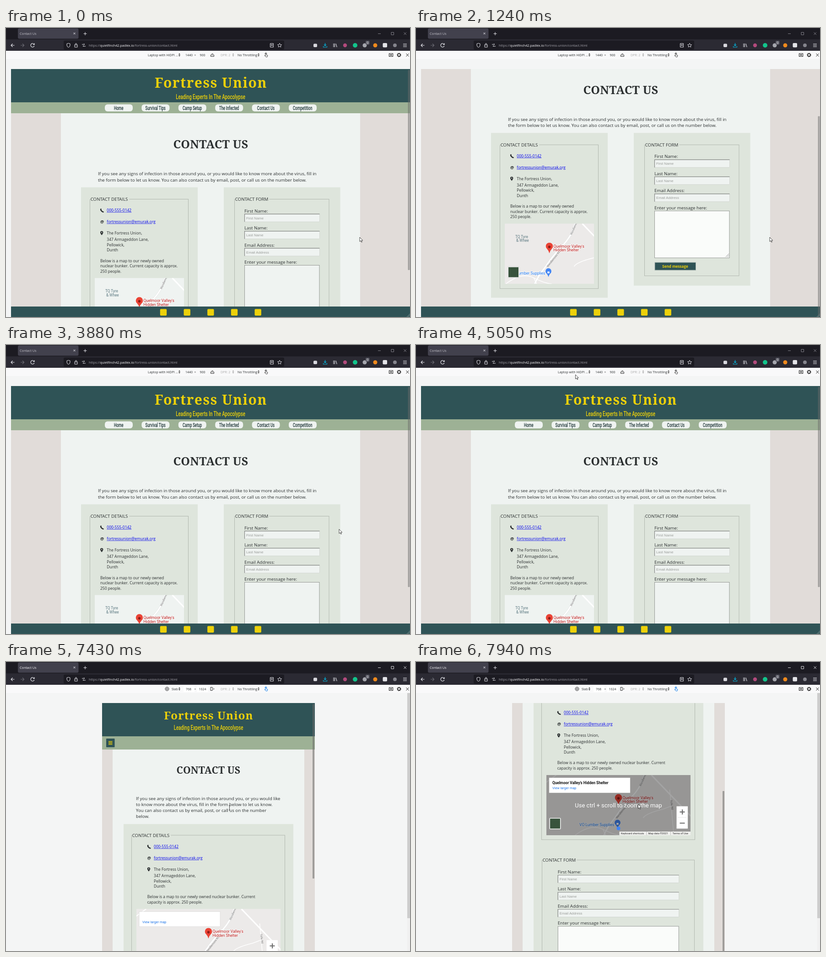
Animation of 883 by 634 pixels, one loop 8 s. Source, as an HTML page:

```html
<!DOCTYPE html>
<html lang="en">
<head>
<meta charset="utf-8">
<title>Contact Us</title>
<style>
html, body { margin: 0; width: 100%; height: 100%; overflow: hidden; background: #f4f5f5; }
svg { display: block; width: 883px; height: 634px; }
text { font-family: 'Open Sans', sans-serif; white-space: pre; }
.slab { font-family: 'Noto Serif', serif; font-weight: 700; }
.narrow, .map { font-family: Roboto, sans-serif; }
.field { font-family: 'Liberation Sans', sans-serif; }
</style>
</head>
<body>
<svg id="stage" viewBox="0 0 883 634" xmlns="http://www.w3.org/2000/svg"></svg>
<script>
const DARK = '#2f5356', SAGE = '#9db195', BEIGE = '#e1dcd9', PAPER = '#eff3f1',
      CARD = '#dee5dc', YELLOW = '#edd10a', INK = '#2b2f30', LINK = '#0000ee';
const LOOP = 8000, BODY = 9.69, SMALL = 8.48;

const rect = (x, y, w, h, fill, more = '') =>
  `<rect x="${x}" y="${y}" width="${w}" height="${h}" fill="${fill}" ${more}/>`;
const circle = (x, y, r, fill, more = '') =>
  `<circle cx="${x}" cy="${y}" r="${r}" fill="${fill}" ${more}/>`;
const line = (d, stroke, width = 1, more = '') =>
  `<path d="${d}" fill="none" stroke="${stroke}" stroke-width="${width}" ${more}/>`;
const text = (x, y, str, size, fill = INK, more = '') =>
  `<text x="${x}" y="${y}" font-size="${size}" fill="${fill}" ${more}>${str}</text>`;
const lines = (x, ys, strs, size) => strs.map((s, i) => text(x, ys[i], s, size)).join('');
const group = (id, body, more = '') => `<g id="${id}" ${more}>${body}</g>`;
const move = (x, y, body) => `<g transform="translate(${x} ${y})">${body}</g>`;
const middle = 'text-anchor="middle"';
const narrow = (x, y, str, size, fill) =>
  `<g transform="translate(${x} ${y}) scale(.645 1)">${text(0, 0, str, size, fill, `class="narrow" font-weight="500" ${middle}`)}</g>`;
const slab = (x, y, str, size, fill, spacing) =>
  text(x, y, str, size, fill, `class="slab" ${middle} letter-spacing="${spacing}"`);
const sorter = x => `<path d="M${x - 2} 58.2l2-2.6 2 2.6zM${x - 2} 59.8l2 2.6 2-2.6z" fill="#333"/>`;

function browserChrome() {
  const light = '#e6e6ec';
  return rect(0, 0, 883, 25, '#1c1b22') + rect(26, 1, 132.5, 22.5, '#42414d', 'rx="3"') +
    rect(0, 25, 883, 25, '#2b2a33') + rect(126, 27.5, 482, 20, '#1c1b22', 'rx="3"') +
    group('tabTitle', text(30, 15, 'Contact Us', 7.2, 'currentColor')) +
    line('M147.500 10l4 4m0-4l-4 4M169.500 12.500h7m-3.500-3.500v7', light) +
    group('windowButtons', line('M813 12.500h6M842 9.500h5.500v5.500h-5.500zM869.500 9.500l5.500 5.500m0-5.500l-5.500 5.500', 'currentColor', .9)) +
    line('M18.500 38h-7.500m3.500-3.500l-3.500 3.500 3.500 3.500', light, 1.2) +
    line('M32 38h7.500m-3.500-3.500l3.500 3.500-3.500 3.500', '#6b6a73', 1.2) +
    line('M61.500 36a4 4 0 1 0 .3 3.200M62 33.500v3h-3', light, 1.2) +
    line('M136.500 33.500l3.500 1v3.500q-.5 3.500-3.500 4.500-3-1-3.500-4.500v-3.500z', light) +
    line('M150 37h6v5h-6zM151.300 37v-1.500a1.700 1.700 0 0 1 3.400 0v1.500', light) +
    line('M166 36h6m-2-1.500l2 1.500M174 40h-6m2-1.500l-2 1.500', light) +
    `<text x="181" y="41" font-size="7.2" fill="#a3a2aa">https://<tspan fill="#fbfbfe">quietfinch42.padlex.io</tspan>/fortress-union/contact.html</text>` +
    line('M577.500 34h7v8h-7zM579 36.500h4m-4 2h4', light) +
    line('M598 33.500l1.300 2.900 3.200.3-2.400 2.100.8 3.200-2.900-1.700-2.900 1.700.8-3.200-2.400-2.100 3.200-.3z', light, .9) +
    rect(672, 34.5, 8, 7.5, '#d8d8de', 'rx="2"') +
    line('M697.500 33v6m-2.500-2.500l2.500 2.500 2.500-2.500M693.500 40v2h8v-2', '#00b8e0', 1.2) +
    line('M716 34v8m2.500-8v8m2.500-7.500l2.200 7.500', light, 1.1) +
    circle(741, 38, 4.2, '#b24a7c') + circle(763, 38, 5, '#12c48b') +
    circle(784, 38, 4.5, '#a5a6ad') + rect(786, 28, 8.5, 8.5, '#5b5b66', 'rx="2"') +
    text(788.3, 35, '0', 7, '#fff') + circle(807, 38, 4.5, '#f08a1d') +
    rect(823.5, 33, 9.5, 9.5, '#e4e4e8', 'rx="2"') + circle(850, 38, 4, '#85858d') +
    line('M868 35h8m-8 3h8m-8 3h8', light);
}

function deviceBar() {
  const laptop = text(310, 61.5, 'Laptop with HiDPI ...', 7) +
    text(392, 61.5, '1440', 7) + text(423.5, 61.5, '900', 7) +
    line('M447.500 59h7v3.500h-7zM449 57.500q2-2.500 4-.5', '#333');
  const tablet = circle(352, 59, 4.3, '#a9a9ab', 'stroke="#888"') + rect(388, 53, 24, 13, '#fff') +
    rect(417, 53, 24, 13, '#fff') + text(362, 61.5, 'Slab', 7) +
    text(393, 61.5, '768', 7) + text(421.5, 61.5, '1024', 7) +
    line('M447 55.500h4v7h-4zM453 57l2 2-2 2', '#333');
  return rect(0, 50, 883, 18, '#f9f9fa') + group('laptopBar', laptop) + group('tabletBar', tablet) +
    sorter(379) + text(411.5, 61.5, '×', 6.5, '#555') +
    text(469, 61.5, 'DPR: 2', 7, '#aaa') + `<g opacity=".45">${sorter(496.5)}</g>` +
    text(506, 61.5, 'No Throttling', 7) + sorter(552) +
    group('touch', line('M567 61v-5q1-1.500 2 0v3l3 1-1 3.500h-3l-3-3.500zM565.500 56.500q2.500-4 5 0', 'currentColor', .9)) +
    line('M837.500 56h8v6.500h-8z', '#222', 1.2) + circle(841.5, 59.2, 1.6, '#222') +
    circle(859, 59.2, 2.8, 'none', 'stroke="#222" stroke-width="1.3"') +
    circle(859, 59.2, 4, 'none', 'stroke="#222" stroke-width="1.4" stroke-dasharray="1.6 1.54"') +
    line('M874.500 56l6 6.500m0-6.500l-6 6.500', '#222');
}

function menu() {
  const items = ['Responsive', 'Slab', 'Slab Mini', 'Slab Large', 'Handset S', 'Handset M', 'Handset L',
    'Reader 7', 'Laptop with HiDPI screen', 'Laptop with touch', 'Edit List...'];
  return rect(309.5, 66.5, 140, 208, '#f9f9f9', 'stroke="#bbb"') + rect(310, 86, 139, 18, '#d9e8f7') +
    items.map((s, i) => text(322, 79.5 + i * 18.7, s, 7)).join('');
}

// Map content is placed around the map's centre.
function mapView(id, x, y, w, wide) {
  const h = 132, left = -w / 2, top = -h / 2;
  const street = (sx, sy, turn, s) =>
    `<text transform="translate(${sx} ${sy}) rotate(${turn})" class="map" font-size="6" fill="#777">${s}</text>`;
  const pin = (px, py, k, fill) =>
    `<path transform="translate(${px} ${py}) scale(${k})" d="M0 0Q-1-5-5-9.500A7.800 7.800 0 1 1 5-9.500Q1-5 0 0Z" fill="${fill}"/>`;
  const halo = 'class="map" stroke="#fff" stroke-width="1.6" paint-order="stroke"';
  const mainRoad = 'M56-66Q50-40 28-17T-8 28Q-24 48-32 66';
  const roads = line(mainRoad, '#dfe2e2', 4) + line(mainRoad + 'M72-66L160 26', '#fff', 3) +
    line('M54 28Q60 18 97 9L118 1M112-34L121 66M-95 66Q-60 40-34 53T5 66M-34 53l6 13', '#fff', 1.5) +
    line('M-158-50l22-16', '#fff', 2);
  const names = street(49, -41, -66, 'Wendlemoss') + street(-3, 30, -52, 'Wendlemoss Rd') +
    street(113, -11, 82, 'Tolle Rd') +
    (wide ? '' : text(-74.5, -34.5, 'TQ Tyre', 8.2, '#5b7880', 'class="map"') +
      text(-72.5, -26, '&amp; Whee', 8.2, '#5b7880', 'class="map"')) +
    text(-9, 45.5, 'VO Lumber Supplies', 8.5, '#1a73e8', halo + ' text-anchor="end"') +
    pin(-2, 51, .82, '#4285f4') + rect(-4.2, 39, 4.4, 4, '#fff') +
    pin(0, -1, 1, '#ea4335') + circle(0, -15, 2.7, '#8c1a16') +
    text(9, -13.5, 'Quelmoor Valley\'s', 8.5, '#b31412', halo) + text(9, -5, 'Hidden Shelter', 8.5, '#b31412', halo);
  const thumb = rect(left + 6.5, top + 94, 25, 25, '#fff', 'rx="2" stroke="#bbb" stroke-width=".5"') +
    rect(left + 8, top + 95.5, 22, 22, '#38533c');
  const controls = rect(left + 6, top + 6, 177, 33, '#fff', 'stroke="#ccc" stroke-width=".5"') +
    group('placeName', text(left + 13, top + 20, 'Quelmoor Valley\'s Hidden Shelter', 8.2, '#111', 'class="map" font-weight="600"')) +
    text(left + 13, top + 31, 'View larger map', 7.3, '#1a73e8', 'class="map"') +
    rect(127, 2.5, 24.5, 49, '#fff') + line('M129 27h20', '#ddd', .7) +
    line('M134 15h11m-5.500-5.500v11M134 39.500h11', '#666', 2) +
    circle(0, 51, 4, '#4285f4') + rect(2, 58, 156, 8, '#f0f0ee') +
    ['Keyboard shortcuts', 'Map data ©2021', 'Terms of Use'].map((s, i) =>
      text([5.5, 65, 118][i], 64.2, s, 5.8, '#222', 'class="map"')).join('') +
    line('M61.500 58v8m52.500-8v8', '#aaa', .7);
  const shade = rect(left, top, w, h, '#000', 'id="shadeFill" opacity=".36"') +
    text(0, 5, 'Use ctrl + scroll to zoom the map', 13, '#fff', `class="map" ${middle}`);
  return `<clipPath id="${id}Clip">${rect(left, top, w, h, '#000')}</clipPath>` +
    move(x + w / 2, y + h / 2, rect(left, top, w, h, 'var(--land)') +
      group(id, roads + names + (wide ? group('shade', shade) : '') + thumb + (wide ? controls : ''),
        `clip-path="url(#${id}Clip)"`));
}

function fieldset(x, y, w, h, title, gap) {
  return rect(x, y, w, h, 'none', 'stroke="#adb3ab" stroke-width=".9"') +
    rect(x + .8, y - 3, gap, 6, CARD) + text(x + 1.2, y + 3.6, title, BODY);
}

function details(paragraph, ys, paraX) {
  const link = (y, s, w) => text(220.3, y, s, SMALL, LINK) + line(`M220.300 ${y + 1.3}h${w}`, LINK, .7);
  return line('M207.500 397.500q-1 1 1 3.500t4 2.500', INK, 2.6, 'stroke-linecap="round"') +
    link(403, '000-555-0142', 54) +
    text(206, 428, '@', 9, INK, 'font-weight="700"') + link(428, 'fortressunion@emurak.org', 99) +
    `<path d="M209.200 454.500q-3.200-4-3.200-5.800a3.200 3.200 0 0 1 6.400 0q0 1.800-3.200 5.800z" fill="${INK}"/>` +
    circle(209.2, 448.7, 1.1, CARD) +
    lines(220.3, [453, 467, 478.5, 490], ['The Fortress Union,', '347 Armageddon Lane,', 'Pellowick,', 'Dunth'], SMALL) +
    lines(paraX, ys, paragraph, SMALL);
}

function form(x, y, w) {
  const box = (by, bh) => rect(x + .5, by, w, bh, PAPER, 'stroke="#c9cdc8" stroke-width=".7" rx="1"') +
    line(`M${x + .5} ${by + bh}v${-bh}h${w}`, '#858885', 1.2);
  return ['First Name', 'Last Name', 'Email Address'].map((s, i) => {
    const ly = y + i * 37.5;
    return text(x, ly, s + ':', BODY) + box(ly + 3.7, 17) +
      text(x + 4, ly + 15.3, s, 7.8, '#9a9d9a', 'class="field"');
  }).join('') + text(x, y + 112.5, 'Enter your message here:', BODY) +
    rect(x + .5, y + 116, w - .5, 103, 'var(--area)', 'stroke="#8d908d" stroke-width=".9"') +
    line(`M${x + w - 8} ${y + 217}l7-7m-3.500 7l3.500-3.500`, '#777', .8) +
    rect(x + 1, y + 229, 89.5, 17, DARK, 'stroke="#a9b5b1"') +
    text(x + 45.5, y + 240.5, 'Send message', 8.07, YELLOW, `font-weight="700" ${middle}`);
}

function laptopPage() {
  const nav = ['Home', 'Survival Tips', 'Camp Setup', 'The Infected', 'Contact Us', 'Competition'];
  const page = rect(11, 90, 872, 73, DARK) + rect(11, 163, 872, 24, SAGE) +
    slab(448, 130.5, 'Fortress Union', 30, YELLOW, 1.5) +
    narrow(447, 156.3, 'Leading Experts In The Apocolypse', 15, YELLOW) +
    nav.map((s, i) => rect(216 + i * 80.4, 167.5, 61, 15.5, PAPER, 'rx="6"') +
      narrow(246.3 + i * 80.4, 180, s, 12, '#1d3436')).join('') +
    rect(120, 187, 654, 560, PAPER) + slab(447.5, 264, 'CONTACT US', 25, INK, .2) +
    lines(201, [323, 336.5], ['If you see any signs of infection in those around you, or you would like to know more about the virus, fill in',
      'the form below to let us know. You can also contact us by email, post, or call us on the number below.'], BODY) +
    rect(164, 349.5, 255, 361.5, CARD) + rect(476, 349.5, 254.5, 335, CARD) +
    fieldset(183.5, 375.5, 215, 315.5, 'CONTACT DETAILS', 85) +
    fieldset(499.5, 375.5, 206.5, 287.5, 'CONTACT FORM', 75) +
    details(['Below is a map to our newly owned', 'nuclear bunker. Current capacity is approx.', '250 people.'], [513.5, 525, 536.5], 206) +
    form(521, 404.5, 164) + mapView('laptopMap', 194, 548.5, 195, false);
  const footer = rect(11, 611, 872, 23, DARK) +
    [344, 395.7, 447.3, 499, 550.7].map(x => rect(x - 7.2, 616.5, 14.4, 14.4, YELLOW, 'rx="2"')).join('') +
    line('M876 634l7-7m-4 7l4-4', '#9aa', .8);
  return rect(11, 90, 872, 544, BEIGE) + group('laptopScroll', page) + footer +
    rect(878.5, 92, 4, 439, '#6b6b6b', 'id="laptopThumb" opacity=".5" rx="1"');
}

function tabletPage() {
  const page = rect(210, 90, 465, 73, DARK) + rect(210, 163, 465, 29, SAGE) +
    slab(443, 125.5, 'Fortress Union', 24, YELLOW, 1.1) +
    narrow(442.5, 148.8, 'Leading Experts In The Apocolypse', 15, YELLOW) +
    rect(219, 168, 18.5, 19, DARK, 'rx="1"') + line('M224 174.500h8.500m-8.500 3h8.500m-8.500 3h8.500', YELLOW, 1.3) +
    rect(233, 192, 419, 1000, PAPER) + slab(442.5, 244.5, 'CONTACT US', 21.3, INK, .2) +
    lines(284, [302.5, 315.7, 329, 342.3], ['If you see any signs of infection in those around you, or you would like',
      'to know more about the virus, fill in the form below to let us know.',
      'You can also contact us by email, post, or call us on the number', 'below.'], BODY) +
    rect(257, 355.5, 371, 800, CARD) +
    fieldset(274.5, 380, 335, 303.5, 'CONTACT DETAILS', 85) +
    fieldset(275.5, 728, 333, 330, 'CONTACT FORM', 75) +
    move(102.8, 5, details(['Below is a map to our newly owned nuclear bunker. Current', 'capacity is approx. 250 people.'], [513.2, 524.8], 206)) +
    form(309.7, 757.5, 264.5) + mapView('tabletMap', 285, 541.7, 315, true);
  return rect(210, 90, 465, 544, BEIGE) +
    `<clipPath id="tabletClip">${rect(210, 90, 465, 544, '#000')}</clipPath>` +
    `<g clip-path="url(#tabletClip)">${group('tabletScroll', page)}` +
    rect(670, 92, 4, 383, '#6b6b6b', 'id="tabletThumb" opacity=".55" rx="1"') + '</g>' +
    rect(877, 68, 6, 566, '#f0f0f0') + rect(877, 68, 6, 494, '#cdcdcd');
}

const stage = document.getElementById('stage');
stage.innerHTML = rect(0, 0, 883, 634, '#f4f5f5') +
  `<clipPath id="laptopClip">${rect(11, 90, 872, 544, '#000')}</clipPath>` +
  group('laptop', laptopPage(), 'clip-path="url(#laptopClip)"') + group('tablet', tabletPage()) +
  browserChrome() + deviceBar() + group('menu', menu()) +
  group('arrow', '<path d="M0 0V9.500L2.300 7.500L4 11L5.300 10.400L3.800 7H6.800Z" fill="#fff" stroke="#222" stroke-width=".8"/>') +
  group('beam', line('M-1.500 0h3M0 0v10M-1.500 10h3', '#333', .9));

// Steps: each entry holds until the next one starts.
const pointer = [
  [0, 773, 459], [3880, 728, 404], [4000, 620, 310], [4120, 510, 220], [4240, 448, 171],
  [4390, 405, 132], [4510, 367, 98], [4810, 362, 88], [4930, 354, 74], [5050, 348.5, 65],
  [5170, 347, 62], [5440, 345, 77], [5710, 330, 95], [5860, 344.5, 108],
  [6810, 372, 150], [6930, 430, 230], [7050, 475, 300], [7190, 486, 312], [7310, 488.5, 315],
  [7820, 485.5, 312]];
const laptopOffset = [[0, 0], [970, 40], [1090, 95], [1240, 119.3], [2140, 34], [2260, 0]];
const tabletOffset = [[0, 0], [7550, 55], [7670, 165], [7820, 255], [7940, 293.7]];

const at = (steps, t) => steps.filter(s => s[0] <= t).pop().slice(1);
const $ = id => document.getElementById(id);
const show = (id, on) => $(id).setAttribute('display', on ? 'inline' : 'none');
const place = (id, x, y) => $(id).setAttribute('transform', `translate(${x} ${y})`);

function draw(t) {
  const [down] = at(laptopOffset, t), [slide] = at(tabletOffset, t), [x, y] = at(pointer, t);
  const active = t >= 5320, picked = t >= 6290, tablet = t >= 6410, beam = t >= 7190 && t < 7820;
  const pale = !tablet && down < 100;
  show('laptop', !tablet);
  show('tablet', tablet);
  show('laptopBar', !picked);
  show('tabletBar', picked);
  show('menu', active && t < 5560);
  show('tabletMap', t >= 6930);
  show('placeName', t >= 7550);
  show('shade', t >= 7820);
  $('shadeFill').setAttribute('opacity', t < 7940 ? .2 : .36);
  stage.style.setProperty('--land', pale ? PAPER : '#eceae9');
  stage.style.setProperty('--area', pale ? PAPER : '#fafcfa');
  $('tabTitle').style.color = active ? '#fbfbfe' : '#c6c5cd';
  $('windowButtons').style.color = active ? '#f0f0f4' : '#8d8c94';
  $('touch').style.color = picked ? '#0074e8' : '#333';
  place('laptopScroll', 0, -down);
  place('laptopThumb', 0, down * .85);
  place('tabletScroll', 0, -slide);
  place('tabletThumb', 0, slide * .65);
  show('arrow', !beam);
  show('beam', beam);
  place('arrow', x, y);
  place('beam', x, y);
}

const start = performance.now();
function tick() {
  draw((performance.now() - start) % LOOP);
  requestAnimationFrame(tick);
}
tick();
</script>
</body>
</html>
```
